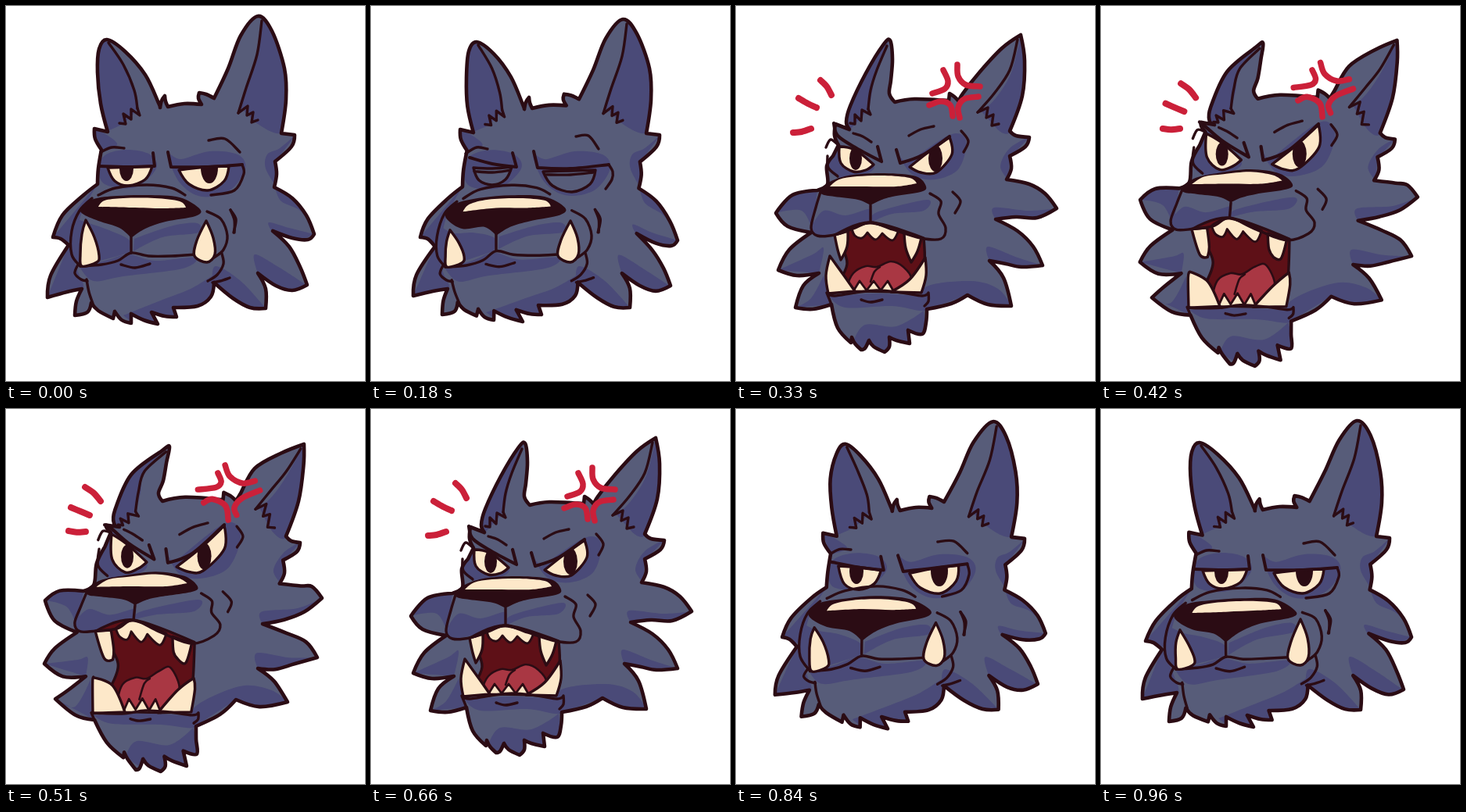
Animation, 459 px wide and 480 px high, one loop 990 ms. Source, as an HTML page with a canvas:

```html
<!DOCTYPE html>
<html>
<head>
<meta charset="utf-8">
<style>
html, body { margin: 0; width: 100%; height: 100%; overflow: hidden; background: #fff; }
canvas { display: block; }
</style>
</head>
<body>
<canvas id="stage" width="459" height="480"></canvas>
<script>
const ctx = document.getElementById('stage').getContext('2d');
const FUR = '#575c79', SHADE = '#4a4a78', INK = '#2b0c14', CREAM = '#fde8c9', RED = '#cb2039';
const LOOP = 990;

// Displacements as "from>to" handles; nearby points follow the closest handles.
const warps = {
  none: '0,0>0,0',
  blink: `129,43>135,46 117,85>122,92 194,122>193,124 322,12>322,16 358,100>358,100 113,158>114,159 370,165>370,165
    394,292>392,300 385,358>383,359 332,387>331,386 60,296>63,296 53,373>54,371 88,396>91,395 158,407>155,403
    190,408>190,405 215,398>215,395 97,257>97,260 248,262>248,260 102,275>101,288 105,333>105,334
    256,275>255,275 254,327>252,327 160,297>160,294 260,205>260,205 155,206>155,206`,
  angry: `129,43>153,47 117,85>125,95 121,125>124,128 178,88>187,92 195,124>201,126 113,158>109,162 322,13>336,20
    300,38>308,48 358,100>361,100 268,116>268,118 370,165>370,167 394,292>398,281 341,288>340,290 385,358>387,347
    322,342>325,340 332,387>340,382 60,296>58,287 80,306>75,302 53,373>46,357 88,396>78,391 97,362>90,357
    158,407>155,410 190,408>190,413 215,398>220,402 97,257>91,255 248,262>249,256 175,246>175,240
    102,275>98,288 105,333>105,340 256,275>255,272 254,327>252,328 160,297>162,297 260,205>260,205 155,206>155,206`,
  settle: `129,43>126,43 322,13>327,15 358,100>359,100 370,165>370,165 394,292>397,292 385,358>387,360
    332,387>332,385 60,296>57,297 53,373>53,371 88,396>87,400 158,407>158,407 190,408>191,408 102,275>101,284
    105,333>106,333 256,275>255,269 254,327>252,327 97,257>95,258 248,262>249,261 260,205>260,205 155,206>155,206`,
  roar: `197,44>209,48 146,128>139,130 166,86>160,84 198,95>201,92 203,123>200,118 364,37>381,45 290,112>300,108
    366,115>374,118 350,160>358,163 375,168>376,171 352,208>356,210 410,259>404,242 332,273>328,275 392,332>398,318
    324,326>322,332 352,384>360,375 296,370>294,372 51,265>50,245 96,290>92,288 54,338>49,326 106,342>102,342
    76,386>63,371 147,431>150,446 160,440>166,462 190,443>198,464 222,432>231,457 122,382>113,398 244,388>243,406
    116,367>109,389 246,367>246,389 180,364>178,386 108,234>103,231 243,231>245,227 172,255>165,251 172,277>163,270
    96,284>87,272 104,294>94,284 126,293>114,284 262,298>266,290 268,284>274,276 134,325>137,320 224,328>220,320
    120,320>112,345 242,322>240,345 152,364>152,387 200,364>196,387 180,334>180,345 132,180>135,160
    150,212>152,209 176,203>180,196 222,206>218,202 273,168>279,149 256,213>252,207 108,95>101,100 122,114>121,118
    80,118>83,126 103,130>107,136 73,162>80,156 96,157>102,157 251,112>245,103 265,82>271,82 283,75>280,72
    312,103>318,92 247,127>253,120 277,141>284,143 286,143>295,135 310,116>325,104`
};
for (const name in warps) warps[name] = warps[name].trim().split(/\s+/).map(h => h.split(/[,>]/).map(Number));

let handles = warps.none, amount = 0;

function bend([x, y, corner]) {
  let total = 0, dx = 0, dy = 0;
  for (const [hx, hy, tx, ty] of handles) {
    const w = ((x - hx) ** 2 + (y - hy) ** 2 + 20) ** -1.5;
    total += w; dx += w * (tx - hx); dy += w * (ty - hy);
  }
  return [x + amount * dx / total, y + amount * dy / total, corner];
}

// "x,y" is a smooth point, "x,y*" a corner.
const parse = text => text.trim().split(/\s+/).map(p => [...p.replace('*', '').split(',').map(Number), p.endsWith('*')]);

const blend = (a, b, k) => {
  const q = parse(b);
  return parse(a).map(([x, y, c], i) => [x + (q[i][0] - x) * k, y + (q[i][1] - y) * k, c]);
};

function spline(points, closed, bent = true) {
  const p = bent ? points.map(bend) : points, n = p.length, path = new Path2D();
  const at = i => closed ? p[(i + n) % n] : p[Math.max(0, Math.min(n - 1, i))];
  const slope = (i, axis) => at(i)[2] ? 0 : (at(i + 1)[axis] - at(i - 1)[axis]) / 6;
  path.moveTo(p[0][0], p[0][1]);
  for (let i = 0; i < (closed ? n : n - 1); i++) {
    const [x, y] = at(i), [u, v] = at(i + 1);
    path.bezierCurveTo(x + slope(i, 0), y + slope(i, 1), u - slope(i + 1, 0), v - slope(i + 1, 1), u, v);
  }
  if (closed) path.closePath();
  return path;
}

function fill(text, color, outline = 0) {
  const path = spline(parse(text), true);
  ctx.fillStyle = color;
  ctx.fill(path);
  if (outline) stroke(path, outline);
}

function stroke(path, width, color = INK) {
  ctx.lineWidth = width;
  ctx.strokeStyle = color;
  ctx.stroke(path);
}

const lines = (list, width = 3.4, color = INK) => list.forEach(t => stroke(spline(parse(t), false), width, color));

function body(outline, shades) {
  const path = spline(parse(outline), true);
  ctx.fillStyle = FUR;
  ctx.fill(path);
  ctx.save();
  ctx.clip(path);
  shades.forEach(s => fill(s, SHADE));
  ctx.restore();
  stroke(path, 4.6);
}

function eye(path, color, pupil) {
  ctx.fillStyle = color;
  ctx.fill(path);
  if (pupil) {
    ctx.save();
    ctx.clip(path);
    ctx.fillStyle = INK;
    ctx.beginPath();
    ctx.ellipse(...pupil, 0, 0, 7);
    ctx.fill();
    ctx.restore();
  }
  stroke(path, 3.4);
}

// Left eye, right eye, then lids and brows.
const faces = {
  rest: ['130,207* 160,206 187,205* 178,222 157,230 139,224', '221,210* 255,206 285,205* 279,224 258,236 234,228',
    '188,188 190,205* 155,206 120,205', '207,187 211,206* 255,206 302,203', '121,187 135,181 151,182',
    '259,172 280,170 299,187', '302,203 304,215 292,236 262,242'],
  shut: ['131,207* 155,208 180,206* 172,222 155,229 138,223', '220,212* 255,211 287,210* 280,228 257,238 232,230',
    '181,188 186,206* 155,202 126,194', '208,186 213,207* 255,208 304,203', '121,189 135,181 149,183',
    '262,167 278,166 291,183', '304,203 309,212 308,222 300,234'],
  angry: ['132,192* 158,198 183,209* 175,226 158,233 138,224', '223,211* 255,200 284,193* 285,215 266,236 238,230',
    '181,190 187,208* 158,197 124,182', '207,188 218,211* 252,200 286,191', '122,182 130,177 141,177',
    '256,167 276,168 291,181', '286,191 289,208 282,226 266,237']
};
const pupils = {
  rest: [[154, 208, 9, 16], [260, 207, 11, 20]],
  angry: [[153, 211, 9, 18], [261, 211, 10, 19]]
};

function drawCalm({ from = 'rest', to = 'rest', k = 0 }) {
  body(`113,157* 130,161* 121,125 117,85 119,55 129,43 152,58 178,88 195,124 197,130* 199,121 203,115* 204,122
    207,129* 228,125 250,126* 246,118 247,111* 256,113 266,118* 284,80 300,38 322,13 340,32 356,80 358,120 352,163*
    369,165* 365,180 344,199* 346,215 343,232* 366,246 384,268 394,292* 386,299 366,297 341,288* 362,308 376,334
    385,357* 366,364 345,358 322,342* 332,362 332,387* 312,386 290,374 266,354* 262,372 245,384 214,386* 218,398*
    203,397 186,392* 194,407* 176,402 160,394* 160,406* 148,402 139,391* 137,400* 118,390 109,380* 104,392 88,396*
    90,378 97,362* 78,366 53,373* 57,345 80,306* 70,298 60,296* 72,268 98,243 117,228* 118,208 122,184* 114,170`,
  ['131,46* 150,75 164,108 167,132 148,152* 130,160* 112,100 116,50', '326,18* 322,60 300,130* 318,148* 352,162 364,110 345,30',
    '394,292* 366,302 341,290* 336,277 362,284', '385,358* 345,366 322,342* 318,318 350,335',
    '332,387* 290,382 264,354* 268,333 300,352', '371,164* 344,200* 346,232* 332,208 334,190 350,182',
    '344,232* 372,244 396,288* 376,262 352,250', '112,156* 122,185* 142,178 132,167', '119,206 128,190 155,184 184,190 192,208 165,232 126,228',
    '207,190 224,196 260,186 296,190 306,208 286,236 250,244 222,226', '88,272* 82,315 96,333* 157,316* 158,300 132,287 106,278',
    '163,314* 164,298* 210,282 244,278 246,290 200,296', '95,335* 130,325 157,318 190,326 242,322 226,336 150,346 112,352',
    '150,396* 200,376 236,362 264,345* 258,386 190,414', '117,228* 60,296* 84,300 98,262', '80,306* 53,373* 97,364 92,340']);
  lines(['131,47 150,75 164,108 168,131', '168,131 171,140* 160,132* 160,145* 150,138* 153,151* 145,150',
    '327,19 321,62 307,105 297,137', '297,137 309,128* 308,140* 316,136* 314,149* 322,146']);

  const mixed = faces[from].map((line, i) => blend(line, faces[to][i], k));
  const near = k < .5 ? from : to, asleep = near === 'shut' || to === 'shut' && k === 1;
  mixed.forEach((points, i) => {
    const path = spline(points, i < 2, false);
    if (i > 1) stroke(path, i < 4 ? 4 : 3.4);
    else eye(path, asleep ? FUR : CREAM, asleep ? null : (pupils[near] || pupils.rest)[i]);
  });
  if (asleep) lines(['132,211 155,213 178,210', '224,216 255,216 284,213']);

  lines(['118,242 140,233 180,229 212,233 229,242', '110,246 94,262 84,288 84,318 95,333', '160,294 160,316',
    '95,333 122,331 143,326 160,316 182,320 212,320 242,318', '257,263 275,273 283,294 278,312 266,322',
    '276,317 278,330 270,344 258,352', '92,331 88,342 96,350 104,352', '103,350 106,366 111,381',
    '147,331 165,335 184,330', '264,354 274,352 286,348']);
  fill('96,258 112,247 142,243 180,242 222,245 248,260 242,269 204,276 178,285 160,297* 145,284 118,275 98,266', INK);
  fill('118,257* 126,249 150,246 190,246 222,250 230,258* 200,259 160,258', CREAM);
  fill('102,274* 113,296 119,319 116,328 97,333 95,318 97,292', CREAM, 3.4);
  fill('256,275* 265,297 267,318 257,328 241,320 244,300', CREAM, 3.4);
  lines(['287,261 294,273 291,290', '287,261 292,274 292,290']);
}

function drawRoar() {
  body(`127,151* 145,158* 141,148 146,128 166,86 188,50 197,44 200,68 198,95 196,112 203,123* 228,119 272,121*
    273,112* 279,116 285,122* 290,112 312,84 340,54 364,37* 369,70 366,115 350,160* 358,166 375,168* 370,180 350,192*
    352,208 346,222* 375,228 395,240 410,259* 385,271 358,270 332,273* 360,288 380,308 392,332* 365,334 345,330
    324,326* 342,348 352,384* 322,382 296,370* 275,381 244,388* 243,405 238,420 220,415* 222,432* 205,428 196,424*
    196,436 190,443* 176,436 170,428* 165,438 160,440* 152,432 148,424* 147,431* 130,412 122,382* 98,388 76,386*
    86,358 106,342* 78,345 54,338* 68,312 96,290* 66,282 51,265* 72,242 104,236* 117,228 116,205 124,192*
    131,178* 126,166`,
  ['195,46* 180,80 174,110 168,132 146,158* 138,140 165,80', '364,37* 352,85 332,118 314,135* 330,153* 350,162 375,110',
    '410,259* 370,276 332,273* 330,258 375,262', '392,332* 350,338 324,326* 322,308 360,322',
    '352,384* 320,386 296,370* 240,390* 242,360 300,352 335,362', '376,167* 350,194* 348,222* 338,205 350,182',
    '51,265* 72,242 104,236* 98,288* 84,262', '54,338* 106,342* 112,310 98,318', '76,386* 122,382* 112,345* 96,374',
    '116,206 122,188 135,178 176,204 160,217 132,220', '207,190* 218,202* 273,165 294,172 285,208 255,222 226,216',
    '96,284* 106,294 160,282 171,276* 172,260 140,268 112,262', '175,276* 180,264 244,248 240,262 200,266',
    '120,372* 180,368 242,372* 241,390 200,384 140,386', '150,430* 165,408 205,410 240,390* 236,425 190,448']);
  lines(['193,51 180,82 172,108 169,132', '169,132 172,139* 161,133* 160,147* 152,139* 152,151* 146,150',
    '360,43 350,82 330,112 309,136', '309,136 322,130* 320,143* 329,139* 327,153* 336,151', '131,178 121,171 115,181']);

  fill('127,293* 172,277 240,297* 241,330 234,366* 180,364 122,366* 142,330', '#5e1017', 3.4);
  fill('144,358 150,342 166,333 180,334 198,327 214,334 224,350 208,364 160,364', '#a93743', 2.6);
  lines(['172,353 177,340 184,334'], 2.6);
  fill('148,285* 152,294 161,297 168,290* 178,299 187,291* 200,300 208,287* 172,278', CREAM, 3);
  fill('126,293* 130,312 134,325* 142,308 143,288*', CREAM, 3.4);
  fill('215,290* 217,310 224,328* 232,314 237,297*', CREAM, 3.4);
  fill('150,365* 158,352* 167,364* 176,352* 185,364* 194,352* 202,366*', CREAM, 2.8);
  fill('120,320* 115,345 118,368* 152,365* 138,345', CREAM, 3.4);
  fill('242,322* 243,345 237,367* 198,366* 222,350', CREAM, 3.4);
  lines(['172,255 172,277', '108,238 102,258 96,284 104,294 126,293 150,285 172,277 200,286 236,297 262,298 268,284 259,266 262,250 248,240',
    '122,382 116,367* 126,371 152,367 180,364 212,367 238,371 246,367* 246,378 241,384', '160,376 172,379 187,376']);
  fill('108,234 124,223 150,216 190,214 230,218 243,231 236,238 200,244 184,249 172,255* 156,248 126,244 110,241', INK);
  fill('120,231* 132,222 155,218 190,217 222,220 231,227* 205,231 160,231', CREAM);

  const left = spline(parse('132,180* 152,184 176,203* 166,210 150,212 134,201'), true);
  const right = spline(parse('222,206* 250,184 273,168* 276,190 256,213 236,213'), true);
  const [lx, ly] = bend([153, 195]), [rx, ry] = bend([255, 195]);
  eye(left, CREAM, [lx, ly, 8, 15]);
  eye(right, CREAM, [rx, ry, 9, 17]);
  lines(['125,150 130,166 154,182 186,199* 181,180', '205,184 210,201* 240,190 273,167'], 4.2);
  lines(['117,192 118,207 130,218', '150,163 162,167 173,174', '221,166 236,158 253,154', '288,160 297,173 291,187',
    '277,238 287,250 280,265']);
  lines(['108,95 116,103 122,114', '80,118 92,125 103,130', '73,162 84,161 96,157'], 8, RED);
  lines(['251,112 267,106 271,96 265,82', '283,75 284,90 294,101 312,103', '247,127 262,122 274,127 277,141',
    '286,143 284,130 292,119 310,116'], 7.5, RED);
}

const scenes = [
  { t: 0 },
  { t: 90, to: 'shut', k: .45, warp: 'blink', amount: .5 },
  { t: 180, to: 'shut', k: 1, warp: 'blink', amount: 1 },
  { t: 270, from: 'shut', to: 'angry', k: 1, warp: 'angry', amount: .7 },
  { t: 330, open: true },
  { t: 420, open: true, warp: 'roar', amount: .85 },
  { t: 510, open: true, warp: 'roar', amount: 1 },
  { t: 540, open: true, warp: 'roar', amount: .9 },
  { t: 570, open: true, warp: 'roar', amount: 1 },
  { t: 600, open: true, warp: 'roar', amount: .85 },
  { t: 630, open: true, warp: 'roar', amount: .45 },
  { t: 660, open: true },
  { t: 750, to: 'angry', k: 1, warp: 'angry', amount: 1 },
  { t: 840, to: 'angry', k: .4, warp: 'angry', amount: .45 },
  { t: 930, warp: 'settle', amount: 1.15 },
  { t: 960, warp: 'settle', amount: 1 }
];

let shown;
function tick() {
  const now = performance.now() % LOOP;
  const scene = scenes.filter(s => s.t <= now).pop();
  if (scene !== shown) {
    shown = scene;
    handles = warps[scene.warp || 'none'];
    amount = scene.amount || 0;
    ctx.fillStyle = '#fff';
    ctx.fillRect(0, 0, 459, 480);
    ctx.lineCap = ctx.lineJoin = 'round';
    scene.open ? drawRoar() : drawCalm(scene);
  }
  requestAnimationFrame(tick);
}
tick();
</script>
</body>
</html>
```
